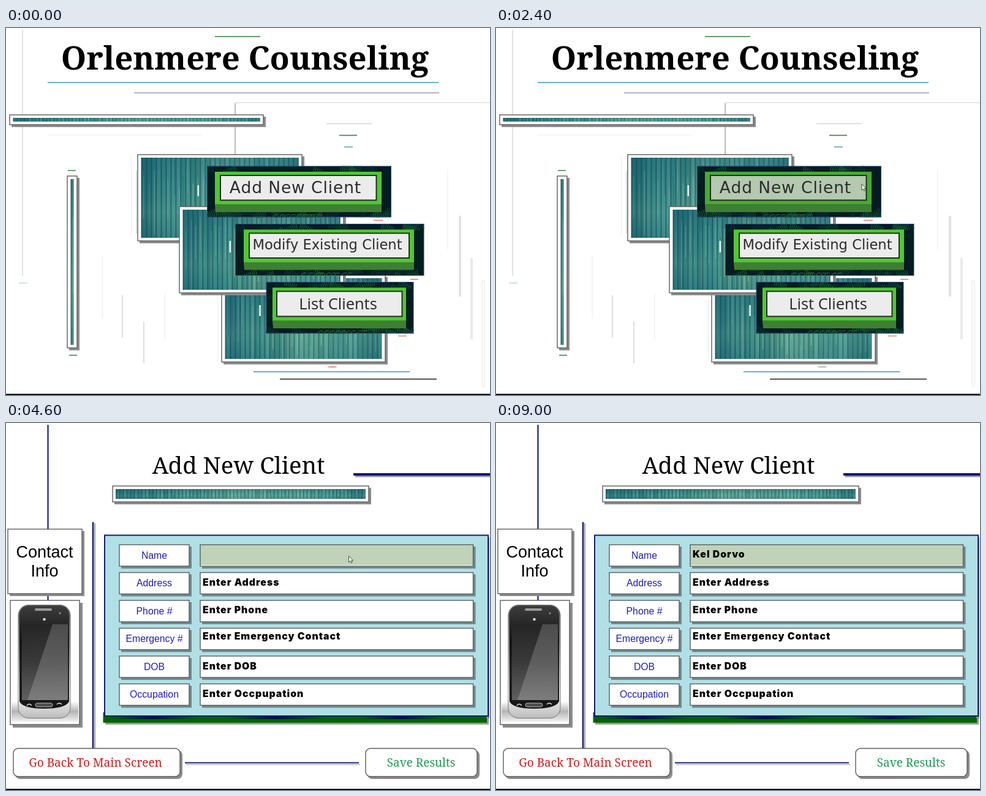
Write an HTML page that moves like this. It is 790x600 px and loops after 9200 ms.

```html
<!DOCTYPE html>
<html lang="en">
<head>
<meta charset="utf-8">
<title>Client form</title>
<style>
html, body { margin: 0; width: 100%; height: 100%; overflow: hidden; background: #fff; }
#stage { display: block; width: 790px; height: 600px; }
.serif { font-family: "Noto Serif", serif; }
.sans { font-family: "Liberation Sans", Arial, sans-serif; }
.wide { font-family: "DejaVu Sans", sans-serif; fill: #2c2c2c; }
.open { font-family: "Open Sans", sans-serif; fill: #262626; }
.heavy { font: 900 15.8px Inter, sans-serif; letter-spacing: 1px; }
</style>
</head>
<body>
<svg id="stage" viewBox="0 0 790 600" xmlns="http://www.w3.org/2000/svg"></svg>
<script>
const LOOP = 9200;
const PAGE_TURN = 2700;
const stage = document.getElementById('stage');

let seed = 7;
const rnd = (a = 0, b = 1) => {
  seed = (seed * 16807) % 2147483647;
  return a + (b - a) * seed / 2147483647;
};
const pick = list => list[Math.floor(rnd(0, list.length))];
const repeat = (n, fn) => Array.from({ length: n }, (_, i) => fn(i)).join('');

const rect = (x, y, w, h, fill, more = '') =>
  `<rect x="${x}" y="${y}" width="${w}" height="${h}" fill="${fill}" ${more}/>`;
const hline = (x1, x2, y, color, w = 1) => rect(x1, y - w / 2, x2 - x1, w, color);
const vline = (x, y1, y2, color, w = 1) => rect(x - w / 2, y1, w, y2 - y1, color);
const text = (x, y, size, str, cls, more = '') =>
  `<text x="${x}" y="${y}" font-size="${size}" class="${cls}" ${more}>${str}</text>`;
const MID = 'text-anchor="middle"';

// Teal boards seen through a small window
function wood(x, y, w, h, step) {
  const boards = repeat(Math.ceil(w / step), i => {
    const bx = i * step;
    return rect(bx, 0, step + .5, h, pick(['#3a8c8a', '#43968f', '#35847f', '#4b9d96'])) +
      rect(bx + step * rnd(.3, .8), h * rnd(0, .4), step * .16, h * rnd(.4, .9),
        pick(['#7dbcab', '#2a717a', '#9cc9a8', '#5fac a3'.replace(' ', '')]), 'opacity=".7"') +
      rect(bx, 0, step * .22, h, '#195560', 'opacity=".9"');
  });
  return `<svg x="${x}" y="${y}" width="${w}" height="${h}">${boards}` +
    rect(0, 0, w, h, 'url(#woodTone)') + rect(0, 0, w, h, 'url(#woodFall)') + '</svg>';
}

function card(x, y, w, h, { depth = 3, r = 0, shadow = '#8c8c8c', edge = '#5c5c5c', id = '' } = {}) {
  return rect(x + depth, y + depth, w + 1, h + 1, shadow, `rx="${r}"`) +
    rect(x, y, w, h, '#fff', `rx="${r}" stroke="${edge}" stroke-width="1.4" ${id && `id="${id}"`}`);
}

const framed = (x, y, w, h, step, pad = 5.5) =>
  card(x, y, w, h) + wood(x + pad, y + 5, w - 2 * pad, h - 10, step);

function fern(w, h) {
  const x = rnd(0, w), y = pick([rnd(0, 10), rnd(h - 12, h), rnd(0, h)]);
  const dir = pick([-1, 1]), color = pick(['#0c3a29', '#10492c', '#0a3030', '#175a2c']);
  const d = repeat(7, i => {
    const px = x + dir * i * 3, py = y + i * .9, s = 6 - i * .6;
    return `M${px} ${py}l${dir * 2} ${-s}M${px} ${py}l${-dir} ${s}`;
  });
  return `<path d="${d}" stroke="${color}" stroke-width="1.3" fill="none"/>`;
}

function leafyButton(x, y, w, h, face, plate, id = '') {
  const [fx, fy, fw, fh] = face;
  const bright = repeat(9, i => {
    const bx = w * .36 + i * 9 + rnd(-3, 3);
    return `<path d="M${bx} ${h - 1}q3 -5 8 -3" stroke="#3f9a2c" fill="none" opacity=".75"/>`;
  });
  return `<svg x="${x}" y="${y}" width="${w}" height="${h}">` +
    rect(0, 0, w, h, '#051c20') + repeat(45, () => fern(w, h)) + bright +
    rect(.5, .5, w - 1, h - 1, 'none', 'stroke="#2f4a8c"') + '</svg>' +
    `<path d="M${fx} ${fy + fh}h${fw}v12.5h${-fw + 1}z" fill="#3f7f33"/>` +
    rect(fx, fy, fw, fh, '#50c832', id && `id="${id}Face"`) +
    rect(...plate, '#ececec', `stroke="#242a24" stroke-width="2" ${id && `id="${id}Plate"`}`);
}

function mainPage() {
  const pale = '#e9e9e9', grey = '#bdbdbd', blue = '#45a5cf', green = '#3f8447';
  return hline(341, 415, 14, green, 1.6) +
    text(390, 67.5, 52.6, 'Orlenmere Counseling', 'serif', `font-weight="700" ${MID}`) +
    hline(68, 706, 89.2, blue, 1.7) + hline(209, 707, 106, '#8f8f8f', 1.3) +
    hline(374, 790, 122, '#cfcfcf') + vline(374, 123, 207, '#8f8f8f', 1.2) +
    vline(27, 3, 405, '#c6c6c6') + hline(21, 35, 417, '#8fc6de') +
    hline(68, 320, 175, '#f0f0f0') +
    hline(523, 597, 156.5, '#c8c8c8') + hline(544, 573, 175.5, green, 1.7) +
    hline(552, 566, 194.5, '#43ad85', 1.5) +
    hline(101, 114, 233, green, 1.5) + hline(103, 116, 535, '#347a68', 1.5) +
    vline(204.5, 210, 340, pale) + vline(213, 233, 336, grey) +
    vline(157, 373, 475, pale) + vline(190, 437, 506, grey) + vline(225, 480, 548, grey) +
    vline(259, 434, 510, pale) + vline(346, 440, 542, pale) +
    vline(721, 231, 362, '#ededed') + vline(741, 307, 439, '#e2e2e2', 4) +
    vline(760, 376, 509, '#e9e9e9', 4) + rect(777, 413, 4, 173, '#fff', 'stroke="#e6e6e6"') +
    framed(6, 142, 414, 16, 6) +
    framed(100, 242, 16, 281, 5) +
    framed(215, 207, 268, 141, 8) + framed(352, 404, 267, 142, 8) + framed(283, 292, 268, 141, 8) +
    vline(313.7, 257, 275, '#f2f5f2', 2.4) + vline(365.8, 348, 367, '#f2f5f2', 2.4) +
    vline(414.5, 453, 471, '#f2f5f2', 2.4) +
    leafyButton(328, 225.5, 301, 84, [341, 235, 272, 53.5], [350, 241, 254.5, 40.5], 'add') +
    text(472.5, 269.8, 26.5, 'Add New Client', 'wide', `letter-spacing=".9" ${MID}`) +
    leafyButton(374, 320, 308.5, 85, [388, 329.5, 278, 53.5], [397, 335.5, 261, 40.5]) +
    text(524.5, 362, 22.6, 'Modify Existing Client', 'wide', MID) +
    leafyButton(424.5, 415, 241, 84.5, [435, 424.5, 218, 54], [442, 430.5, 204.5, 41]) +
    text(542, 460, 25.5, 'List Clients', 'open', MID) +
    hline(600, 615, 314.5, '#ee7d78', 1.6) + hline(660, 673, 411, '#ee7d78', 1.6) +
    hline(640, 654, 503.5, '#d99088', 1.6) +
    '<ellipse id="spot" cx="532.5" cy="554" rx="7.5" ry="1.6"/>' +
    hline(404, 659, 562, blue, 1.7) + hline(447, 703, 574, '#222', 1.5);
}

function phone() {
  return card(7, 290, 113, 203, { depth: 4 }) +
    rect(9, 455, 109, 33, 'url(#floor)') +
    rect(20, 297.5, 85, 185, 'url(#shell)', 'rx="17" stroke="#777"') +
    '<path d="M22 455V316Q22 300 38 299H88Q103 300 103 316V455Q98 467 62 467Q27 467 22 455Z" fill="url(#glass)"/>' +
    rect(47, 303, 28, 4, '#9b9b9b', 'rx="2"') +
    '<circle cx="88" cy="311" r="1.7" fill="#888"/>' +
    rect(60.5, 319, 4, 4, '#d5d5d5') +
    rect(26, 329, 75, 124, 'url(#screen)') +
    '<path d="M76 329H101V453H35Z" fill="#fff" opacity=".18"/>' +
    rect(48, 458, 28, 6, '#4c4c4c', 'rx="3" stroke="#bbb"') +
    '<path d="M34 462q4 -5 8 0M83 460q4 -4 8 0" stroke="#ddd" stroke-width="1.5" fill="none"/>';
}

const fields = [
  ['Name', 'Enter Name', 220], ['Address', 'Enter Address', 266], ['Phone #', 'Enter Phone', 311],
  ['Emergency #', 'Enter Emergency Contact', 354], ['DOB', 'Enter DOB', 403],
  ['Occupation', 'Enter Occpupation', 447.5]
];

function formPage() {
  const navy = '#16207c', teal = '#71898d';
  const rows = fields.map(([label, hint, base], i) => {
    const y = 199 + i * 45.5, first = i === 0;
    return card(185, y, 114, 35, { shadow: teal }) +
      text(242, y + 22.6, 15.8, label, 'sans', `fill="#1c1cc8" ${MID}`) +
      card(317, y, 445.5, 35, { shadow: teal, id: first ? 'box' : '' }) +
      (first ? hline(318, 762, 233, '#fff', 1) : '') +
      `<text x="321" y="${base}" class="heavy" ${first ? 'id="entry"' : ''}>${hint}</text>`;
  }).join('');
  const smudges = [170, 360, 575].map((x, i) =>
    rect(x, 480, 140 + 20 * (i % 2), 4, 'url(#smudge)')).join('');
  return vline(68.5, 3, 290, navy, 2.2) +
    hline(570, 790, 87, '#999', 3) + hline(567, 790, 84, '#0c1580', 4) +
    text(379.5, 83, 38.3, 'Add New Client', 'serif', MID) +
    framed(174, 103, 418, 26, 6, 5) +
    card(3, 173.5, 121, 105.5) +
    text(63, 219.5, 27, 'Contact', 'sans', MID) + text(63, 251, 27, 'Info', 'sans', MID) +
    phone() +
    vline(145, 164, 532, '#a5a5a5', 2) + vline(142, 162, 532, navy, 2.6) +
    rect(162, 482, 626, 11, '#999') + rect(158.5, 473, 626.5, 17, '#006400') + smudges +
    rect(784, 187, 5, 296, '#8c8c8c') +
    rect(161, 183.5, 626, 295.5, '#b0e0e6', 'stroke="#101c78" stroke-width="2"') + rows +
    card(12, 532, 272, 46, { r: 8 }) +
    text(146, 561.5, 19, 'Go Back To Main Screen', 'serif', `fill="#e01818" ${MID}`) +
    hline(294, 578, 558.5, '#aaa', 1.2) + hline(292, 576, 555.5, navy, 2) +
    card(587, 532, 182, 46, { r: 8 }) +
    text(677.5, 561.5, 19, 'Save Results', 'serif', `fill="#1f9d55" ${MID}`);
}

function gradient(id, vertical, stops) {
  const step = 100 / (stops.length - 1);
  return `<linearGradient id="${id}" x2="${vertical ? 0 : 1}" y2="${vertical ? 1 : 0}">` +
    stops.map((c, i) => `<stop offset="${i * step}%" stop-color="${c}"/>`).join('') + '</linearGradient>';
}

stage.innerHTML = '<defs>' +
  gradient('woodTone', false, ['#0d4a6070', '#1d6a7430', '#b4d8a030', '#8fd0b428', '#0d4a6048']) +
  gradient('woodFall', true, ['#0d4a6048', '#0d4a6010', '#a8d0a018', '#0d4a6020']) +
  gradient('shell', true, ['#555', '#777', '#999', '#ccc', '#f4f4f4', '#bbb']) +
  gradient('glass', true, ['#3c3c3c', '#141414', '#202020', '#151515']) +
  gradient('screen', true, ['#252525', '#3a3a3a', '#606060']) +
  gradient('floor', true, ['#ffffff', '#b5b5b5', '#eeeeee']) +
  gradient('smudge', false, ['#05104000', '#050c40', '#05104000']) +
  '</defs>' + rect(0, 0, 790, 600, '#fff') +
  `<g id="main">${mainPage()}</g><g id="form">${formPage()}</g>` +
  hline(0, 790, 599, '#15151c', 2) +
  '<path id="cursor" d="M0 0V10L2.3 8L4 11.3L5.6 10.5L4.1 7.3H7Z" fill="#fff" stroke="#222" stroke-width=".8"/>';

const $ = id => document.getElementById(id);
const main = $('main'), form = $('form'), cursor = $('cursor'), spot = $('spot');
const addFace = $('addFace'), addPlate = $('addPlate'), box = $('box'), entry = $('entry');

// time, x, y of the pointer
const path = [
  [900, 735, 246], [1200, 631, 253], [1600, 601, 256], [2000, 597, 255], [2800, 597, 255],
  [3500, 562, 218], [3700, 562, 218], [4000, 559.5, 217.5]
];
const SHOW = 900, HIDE = 7900;
const client = 'Kel Dorvo';
const keys = [4900, 5150, 5400, 6000, 6200, 6500, 6700, 6900, 7200];

function pointerAt(t) {
  const i = path.findIndex(p => p[0] > t);
  if (i < 0) return path[path.length - 1].slice(1);
  if (i === 0) return path[0].slice(1);
  const [t0, x0, y0] = path[i - 1], [t1, x1, y1] = path[i];
  const k = (t - t0) / (t1 - t0);
  return [x0 + (x1 - x0) * k, y0 + (y1 - y0) * k];
}

function draw(t) {
  const onMain = t < PAGE_TURN;
  main.style.display = onMain ? '' : 'none';
  form.style.display = onMain ? 'none' : '';

  const [x, y] = pointerAt(t);
  cursor.style.display = t >= SHOW && t < HIDE ? '' : 'none';
  cursor.setAttribute('transform', `translate(${x} ${y})`);

  const hover = t >= SHOW && x < 628;
  addFace.setAttribute('fill', hover ? '#46ac2f' : '#50c832');
  addPlate.setAttribute('fill', hover ? '#b4c9b0' : '#ececec');
  spot.setAttribute('fill', t < 400 ? '#f79c9c' : '#c9c6c2');

  box.setAttribute('fill', t < 4000 ? '#fff' : '#c0d3b9');
  entry.textContent = t < 4400 ? 'Enter Name' : client.slice(0, keys.filter(k => k <= t).length);
}

function tick() {
  draw(performance.now() % LOOP);
  requestAnimationFrame(tick);
}
tick();
</script>
</body>
</html>
```
